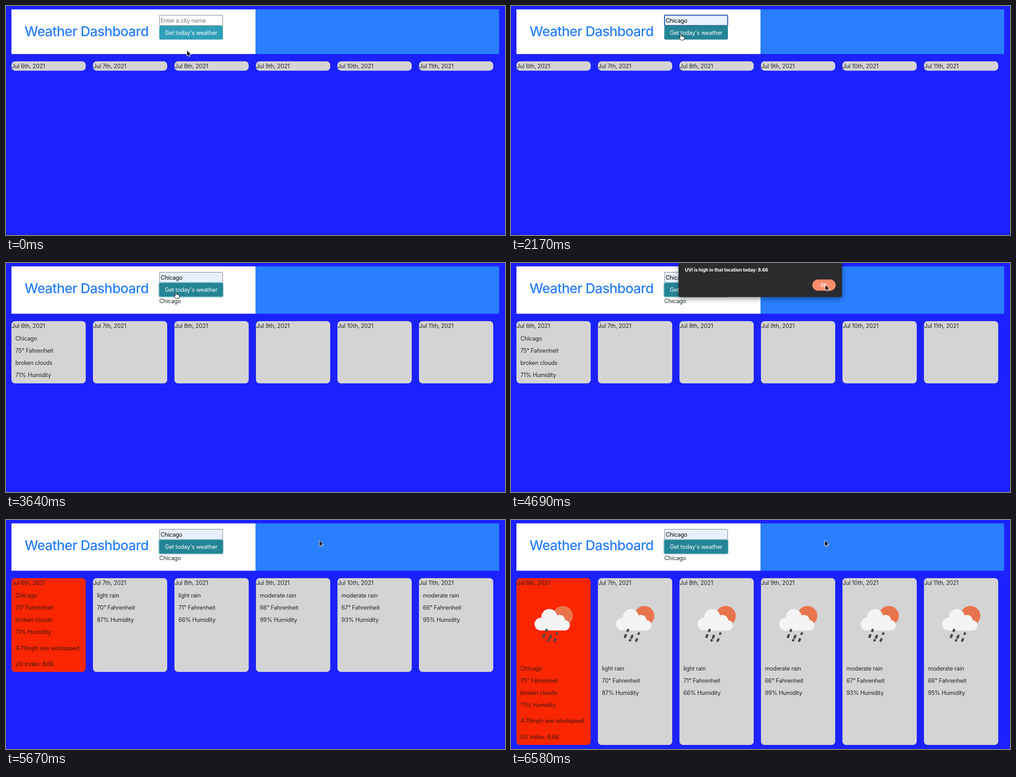
These frames come from a looping animation (1102x508 px, 7.14 s). An HTML page:

```html
<!DOCTYPE html>
<html lang="en">
<head>
<meta charset="utf-8">
<title>Weather Dashboard</title>
<style>
  html, body { margin: 0; width: 100%; height: 100%; overflow: hidden; background: #1c22ff; }
  svg { display: block; width: 1102px; height: 508px; }
  text { font: 12.6px Inter, sans-serif; letter-spacing: -.2px; fill: #212529; white-space: pre; }
  .title { font-size: 30px; font-weight: 500; letter-spacing: -.69px; fill: #2980ff; }
  .small { font-size: 10.2px; font-weight: 700; letter-spacing: -.12px; fill: #fff; }
  .alert-box { filter: drop-shadow(0 4px 6px #0006); }
</style>
</head>
<body>
<svg viewBox="0 0 1102 508">
  <defs>
    <g id="icon">
      <circle cx="102.5" cy="83.5" r="22" fill="#e8744d"/>
      <g fill="#f4f4f4">
        <circle cx="54" cy="102" r="14"/>
        <circle cx="72.5" cy="86" r="17.5"/>
        <circle cx="95" cy="94" r="12.5"/>
        <circle cx="106.5" cy="104.5" r="11.5"/>
        <path d="M54 90H104V116H54Z"/>
      </g>
      <path d="M66.5 115l-.8 2M61.3 126.5l-1.6 4M75.8 128l-1.6 4M90.3 122.500l-.6 1M71.300 137.500l-.6 .6M86 135.500l-1.600 3.500"
        stroke="#4a4a4a" stroke-width="5.200" stroke-linecap="round"/>
    </g>
  </defs>

  <rect id="panel" x="12" y="7.500" width="539" fill="#fff"/>
  <rect id="banner" x="551" y="7.500" width="538" fill="#297fff"/>
  <text class="title" x="41" y="67">Weather Dashboard</text>

  <rect id="field" x="339" y="20.500" width="139.500" height="23" rx="1"/>
  <text id="entry" x="341.500" y="36.700"></text>
  <rect id="glow" x="336.500" y="42" width="144" height="34.500" rx="4.500" fill="#9ccfd9"/>
  <rect id="button" x="338.500" y="44" width="140.500" height="30.500" rx="3"/>
  <text x="408.800" y="63.800" text-anchor="middle" style="fill:#fff">Get today's weather</text>
  <text id="city" x="338.500" y="89">Chicago</text>

  <g id="cards"></g>

  <g id="menu">
    <rect x="338" y="45" width="154.500" height="186" rx="2" fill="#292b2c"/>
    <rect id="hover" x="338" y="52" width="154.500" height="28.800" fill="#46484a"/>
  </g>

  <g id="alert">
    <rect class="alert-box" x="370" y="-10" width="361" height="85.500" rx="4" fill="#2a2b2d"/>
    <text class="small" x="384" y="19.300">UVI is high in that location today: 8.66</text>
    <rect id="ok" x="665.500" y="36.500" width="51.500" height="25" rx="12.500"/>
    <text class="small" x="691" y="52.500" text-anchor="middle">OK</text>
  </g>

  <g id="cursor">
    <circle id="ring" r="23.500" fill="none" stroke="#000" stroke-width="2.600"/>
    <path id="arrow" d="M0 0V13L3 10.300L5 14.800L7.200 13.800L5.300 9.500H9.300Z" fill="#000" stroke="#fff"/>
    <g id="beam" fill="none">
      <path d="M-3-6.500Q0-6.500 0-4.500Q0-6.500 3-6.500M0-5V5M-3 6.500Q0 6.500 0 4.500Q0 6.500 3 6.500M-1.500 1.500H1.500" stroke="#222" stroke-width="1.200"/>
    </g>
    <path id="hand" d="M-1.500 1.200Q0-.8 1.300 1.200V5Q3 4 4 5.400Q5.700 4.800 6.300 6.300Q8 6 8 7.800V10L6.500 13.500H-.5L-4 8.500Q-4.500 6.500-1.500 8Z" fill="#fff" stroke="#000"/>
  </g>
</svg>
<script>
const LOOP = 7140, STEP = 70;
const MENU_OPEN = 490, PREVIEW = 1680, MENU_CLOSE = 2100, SUBMIT = 3290;
const TODAY = 3570, ALERT = 3710, DISMISS = 5390, FORECAST = 5460, ICONS = 5740;
const CLICKS = [[420, 490], [2030, 2100], [3220, 3360], [4760, 4830]];
const PATH = [
  [70, 399.5, 98], [420, 391, 31], [1330, 391, 31], [1400, 390, 38], [1610, 390, 38],
  [1960, 375, 62], [2590, 375, 62], [2800, 375.5, 65], [4130, 375.5, 65],
  [4620, 694, 48], [5390, 694, 48], [5460, 692, 45], [6510, 692, 45], [6580, 693, 45]
];
const DAYS = [
  ["Chicago", "75° Fahrenheit", "broken clouds", "71% Humidity", "4.79mph ave windspeed", "UV Index: 8.66"],
  ["light rain", "70° Fahrenheit", "87% Humidity"],
  ["light rain", "71° Fahrenheit", "66% Humidity"],
  ["moderate rain", "66° Fahrenheit", "99% Humidity"],
  ["moderate rain", "67° Fahrenheit", "93% Humidity"],
  ["moderate rain", "66° Fahrenheit", "95% Humidity"]
];

const $ = id => document.getElementById(id);
const show = (el, on) => { el.style.display = on ? "" : "none"; };

function add(parent, tag, attrs, text = "") {
  const el = document.createElementNS("http://www.w3.org/2000/svg", tag);
  for (const key in attrs) el.setAttribute(key, attrs[key]);
  el.textContent = text;
  return parent.appendChild(el);
}

["Chicago", "las vegas", "Los Angeles", "London", "LA", "asd"].forEach((name, i) =>
  add($("menu"), "text", { class: "small", x: 346.5, y: 69.8 + 28.85 * i }, name));

const cards = DAYS.map((lines, i) => {
  const group = add($("cards"), "g", {});
  const box = add(group, "rect", { width: 164, rx: 8 });
  add(group, "text", { x: 0.5, y: 15.2 }, `Jul ${6 + i}th, 2021`);
  const icon = add(group, "use", { href: "#icon" });
  const details = add(group, "g", {});
  lines.forEach((line, n) =>
    add(details, "text", { x: 8.7, y: 42.8 + 27.2 * n + 8 * Math.max(0, n - 3) }, line));
  return { group, box, icon, details };
});

function cursorAt(t) {
  const next = PATH.findIndex(p => p[0] > t);
  if (next < 1) return (next ? PATH[PATH.length - 1] : PATH[0]).slice(1);
  const [a, b] = [PATH[next - 1], PATH[next]];
  const u = (t - a[0]) / (b[0] - a[0]), ease = u * u * (3 - 2 * u);
  return [1, 2].map(k => a[k] + (b[k] - a[k]) * ease);
}

function cursorKind(t, x, y, menu) {
  if (t >= 3850 || x < 338 || x > 479 || y < 20 || y > 74.5) return "arrow";
  if (y < 44) return "beam";
  return menu ? "arrow" : "hand";
}

function drawCards(t) {
  const top = t < TODAY ? 122.8 : 129;
  const height = t < TODAY ? 20.6 : t < FORECAST ? 138 : t < ICONS ? 208 : 370;
  cards.forEach(({ group, box, icon, details }, i) => {
    const red = i === 0 && t >= FORECAST;
    group.setAttribute("transform", `translate(${12 + 180 * i} ${top})`);
    box.setAttribute("height", height);
    box.setAttribute("fill", red ? "#fa2600" : "#d4d4d5");
    group.querySelectorAll("text").forEach(el => { el.style.fill = red ? "#3a1812" : ""; });
    show(icon, t >= ICONS);
    show(details, t >= (i ? FORECAST : TODAY));
    details.setAttribute("transform", `translate(0 ${t < ICONS ? 0 : 161.8})`);
    [...details.children].forEach((el, n) => show(el, n < 4 || red));
  });
}

function draw(t) {
  const [x, y] = cursorAt(t);
  const menu = t >= MENU_OPEN && t < MENU_CLOSE;
  const kind = cursorKind(t, x, y, menu);
  const focused = t >= CLICKS[0][0] && t < SUBMIT;
  const filled = t >= PREVIEW;

  for (const id of ["panel", "banner"]) $(id).setAttribute("height", t < TODAY ? 99 : 105);
  $("field").setAttribute("fill", filled ? "#e8f0fe" : "#fff");
  $("field").setAttribute("stroke", focused ? "#1a55b0" : "#767676");
  $("field").setAttribute("stroke-width", focused ? 2 : 1);
  $("entry").textContent = filled ? "Chicago" : "Enter a city name";
  $("entry").style.fill = filled ? "#000" : "#757575";
  $("button").setAttribute("fill", kind === "hand" || t >= SUBMIT ? "#248495" : "#309fb8");
  show($("glow"), t >= SUBMIT);
  show($("city"), t >= TODAY);
  drawCards(t);

  show($("menu"), menu);
  show($("hover"), t >= PREVIEW);
  show($("alert"), t >= ALERT && t < DISMISS + 140);
  $("alert").style.opacity = 1 - Math.max(0, t - DISMISS + STEP) / 210;
  $("ok").setAttribute("fill", t >= 4760 && t < 4970 ? "#ee7656" : "#fc8c6d");

  $("cursor").setAttribute("transform", `translate(${x} ${y})`);
  for (const id of ["arrow", "beam", "hand"]) show($(id), id === kind);
  show($("ring"), CLICKS.some(([from, to]) => t >= from && t < to));
}

const start = performance.now();
function tick(now) {
  const t = Math.max(0, now - start) % LOOP;
  draw(Math.floor(t / STEP) * STEP);
  requestAnimationFrame(tick);
}
draw(0);
requestAnimationFrame(tick);
</script>
</body>
</html>
```
